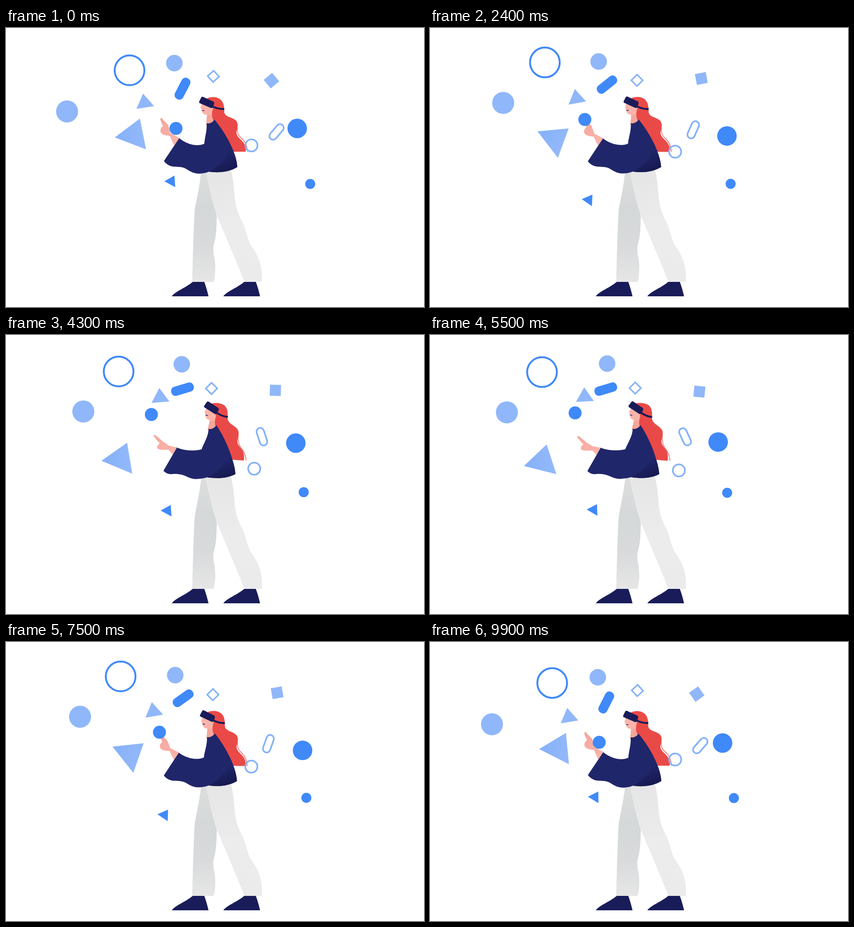
An HTML page with a canvas that plays this animation: 900x600 px, repeating every 10 s.

```html
<!DOCTYPE html>
<html lang="en">
<head>
<meta charset="utf-8">
<title>Floating shapes</title>
<style>
html, body { margin: 0; width: 100%; height: 100%; overflow: hidden; background: #fff; }
canvas { display: block; width: 900px; height: 600px; }
</style>
</head>
<body>
<canvas id="stage" width="900" height="600"></canvas>
<script>
const ctx = document.getElementById('stage').getContext('2d');
const LOOP = 10000, STEP = 100, TURN = 5050;
const BLUE = '#4089f9', LIGHT = '#90b7f9', LINE = '#85b2f7';
const NAVY = '#20266a', DARK = '#191c59', RED = '#ea4a47', SKIN = '#fbb4aa';
const KEYS = [0, 1.5, 3.3, 4.3];
const RAD = Math.PI / 180;

// Cubic through four values at the key times
function curve(v, t) {
  return v.reduce((sum, y, i) => sum + KEYS.reduce(
    (p, k, j) => i === j ? p : p * (t - k) / (KEYS[i] - k), y), 0);
}

// Blend two path strings of equal structure
function morph(a, b, s) {
  const to = b.match(/-?[\d.]+/g);
  let i = 0;
  return a.replace(/-?[\d.]+/g, n => (+n + (to[i++] - n) * s).toFixed(2));
}

function fade(x0, y0, x1, y1, ...stops) {
  const g = ctx.createLinearGradient(x0, y0, x1, y1);
  stops.forEach((c, i) => g.addColorStop(i / (stops.length - 1), c));
  return g;
}

function fill(d, color) {
  ctx.fillStyle = color;
  ctx.fill(new Path2D(d));
}

function stroke(d, color, width) {
  ctx.strokeStyle = color;
  ctx.lineWidth = width;
  ctx.stroke(new Path2D(d));
}

// Place a shape on its track; a line width makes it an outline
function put(t, xs, ys, turn, color, line, trace) {
  ctx.save();
  ctx.translate(curve(xs, t), curve(ys, t));
  if (turn) ctx.rotate(curve(turn, t) * RAD);
  ctx.beginPath();
  trace();
  if (line) {
    ctx.strokeStyle = color;
    ctx.lineWidth = line;
    ctx.stroke();
  } else {
    ctx.fillStyle = color;
    ctx.fill();
  }
  ctx.restore();
}

const disc = r => () => ctx.arc(0, 0, r, 0, 7);
const bar = (w, h, r) => () => ctx.roundRect(-w / 2, -h / 2, w, h, r);
const wedge = k => () => {
  ctx.moveTo(-36 * k, 19 * k);
  ctx.lineTo(36 * k, 19 * k);
  ctx.lineTo(0, -38 * k);
  ctx.closePath();
};

function legs() {
  fill('M421 300 C417 345 409 370 406 395 C404 430 402 500 401 546 L447 546 C452 530 451 510 449 495 C445 480 446 470 449 460 C454 440 453 420 454 405 L432 300Z',
    fade(0, 310, 0, 546, '#dcdddd', '#d5d8d9', '#d8dadb', '#e6e6e6'));
  fill('M428 300 L483 300 C490 325 491 345 492 360 C494 385 500 400 508 415 C518 435 518 450 527 467 C545 490 553 515 551 546 L513 546 C500 510 465 430 455 406 C445 380 438 345 428 300Z',
    fade(0, 310, 0, 546, '#e6e6e6', '#ececec', '#ebebeb'));
  for (const x of [0, 111]) {
    ctx.save();
    ctx.translate(x, 0);
    fill('M357 577 C365 566 385 560 402 546 L427 546 C431 557 434 568 436 577Z', DARK);
    ctx.restore();
  }
}

function tiltHead(s, draw) {
  ctx.save();
  ctx.translate(460, 224);
  ctx.rotate(0.157 * s);
  ctx.translate(-460, -224);
  draw();
  ctx.restore();
}

function upper(s) {
  fill(morph(
    'M332 195 C334 192 336 194 338 197 L349 208 L354 226 L374 237 L362 253 L353 232 C346 231 336 231 333 224 C331 219 334 214 338 211 C335 205 333 200 332 195Z',
    'M318 217 C318 214 322 215 325 218 L339 230 L351 238 L369 242 L360 258 L350 247 C343 247 331 248 326 244 C324 240 327 236 331 233 C326 228 321 222 318 217Z', s),
    fade(330, 195, 365, 250, '#f4a69d', SKIN));

  tiltHead(s, () => {
    fill('M433 183 L431 208 L450 206 L448 176Z', '#f6a79b');
    fill('M422 160 C421 166 419 170 419 172 C421 174 421 176 422 179 C423 184 427 187 434 187 L447 187 L447 160Z', SKIN);
    stroke('M422 177 Q425 179 427 177', NAVY, 1.5);
  });

  fill(morph(
    'M432 152 C440 147 455 147 463 155 C469 161 470 170 470 182 C473 192 485 191 494 198 C502 205 498 214 496 225 C497 236 508 240 513 249 C517 255 517 260 516 266 L488 266 L448 200 C443 194 442 184 446 172 L443 160Z',
    'M441 148 C449 145 464 146 471 152 C478 159 478 170 477 180 C480 192 490 193 497 201 C504 208 500 217 498 228 C498 238 508 244 511 252 C513 259 513 264 512 270 L484 268 L452 198 C449 192 449 184 452 175 L450 160Z', s), RED);
  stroke(morph(
    'M498 214 C498 226 499 230 506 236 C515 243 519 252 520 266',
    'M500 214 C499 228 501 236 506 243 C513 250 516 258 517 270', s), RED, 1.2);

  tiltHead(s, () => {
    stroke('M445 169 Q458 175 470 174', DARK, 4);
    fill('M424 148 L446 158 Q449 160 448 163 L446 170 Q444 173 441 172 L418 162 Q415 161 416 158 L420 150 Q421 147 424 148Z', DARK);
  });

  fill(morph(
    'M432 205 C433 222 428 234 427 249 C411 256 389 250 373 237 L340 286 C345 293 352 297 360 298 C372 299 380 298 388 303 C400 311 408 314 420 313 C428 312 432 311 437 309 C458 312 480 310 498 299 C498 275 478 232 449 197 C444 204 438 206 432 205Z',
    'M436 202 C436 218 426 232 421 246 C405 250 384 249 368 242 L339 292 C344 297 350 300 358 299 C370 298 378 300 386 303 C398 309 406 311 418 309 C426 308 430 307 433 306 C454 309 476 309 494 299 C492 275 478 231 453 194 C448 201 442 203 436 202Z', s), NAVY);
  fill(morph(
    'M484 256 C476 280 456 300 437 309 C458 312 480 310 498 299 C497 285 491 270 484 256Z',
    'M482 256 C474 278 452 298 433 306 C454 309 476 309 494 299 C493 285 489 270 482 256Z', s),
    fade(465, 270, 478, 306, NAVY, '#161950'));
}

function shapes(t) {
  put(t, [131.5, 148, 164.5, 166.5], [179.5, 165, 160.8, 164.5], null, LIGHT, 0, disc(23.7));
  put(t, [266, 251, 245.3, 242.5], [91, 76.5, 75, 78.5], null, BLUE, 4, disc(32));
  put(t, [362.5, 359.5, 369.5, 378.5], [75.5, 75, 68, 63], null, LIGHT, 0, disc(17.8));
  put(t, [627, 640, 634, 624], [216, 226.5, 235, 232.5], null, BLUE, 0, disc(21));
  put(t, [655, 650, 644.5, 641], [335.3, 335.5, 335.5, 338], null, BLUE, 0, disc(10.8));
  put(t, [528.5, 526.5, 530.5, 534.5], [252.5, 258.5, 275.5, 287.5], null, LINE, 3.6, disc(13));

  put(t, [380, 379.5, 382, 380], [130.5, 125.5, 118.5, 116.5],
    [-62.6, -52.8, -25, -16.7], BLUE, 0, bar(50, 20, 9));
  put(t, [582.5, 574.5, 558.7, 551], [223.5, 220, 218.5, 218.7],
    [-50, -53, -85, -108], LINE, 3.6, bar(39, 16, 8));
  put(t, [446.5, 446.5, 444.5, 442.5], [104, 109, 115, 115],
    [48, 46, 45, 45], LINE, 3.2, bar(17.5, 17.5, 0));
  put(t, [571.5, 584, 582, 580], [113.3, 108, 112, 119],
    [-39.8, -17, -6, 2], LIGHT, 0, bar(23.8, 23.8, 0));

  put(t, [274.7, 274.7, 259, 246], [230.3, 231.5, 250.7, 266.8],
    [20.9, 50.3, 43.9, 22.7], fade(-36, 19, 36, -10, '#86b1f8', '#95bafa'), 0, wedge(1));
  put(t, [298.3, 306.7, 324.3, 331.7], [161, 158.8, 142.5, 134.3],
    [-9, -10, -8.5, -4.6], LIGHT, 0, wedge(0.535));
  put(t, [356, 346.7, 340.8, 348], [329.7, 357.2, 377.5, 377.8],
    [28, 39, 29.5, 28.5], BLUE, 0, wedge(0.37));

  put(t, [366, 347.5, 321, 313], [216, 207.5, 184.3, 171], null, BLUE, 0, disc(14));
}

function draw(now) {
  const ms = Math.floor(now % LOOP / STEP) * STEP;
  const t = (ms < TURN ? ms : 2 * TURN - ms) / 1000;
  const k = Math.max(0, (t - 1.8) / 3.25);
  const lean = k * k * (3 - 2 * k) / 0.865;
  ctx.fillStyle = '#fff';
  ctx.fillRect(0, 0, 900, 600);
  legs();
  upper(lean);
  shapes(t);
}

const start = performance.now();
function tick() {
  draw(performance.now() - start);
  requestAnimationFrame(tick);
}
tick();
</script>
</body>
</html>
```
